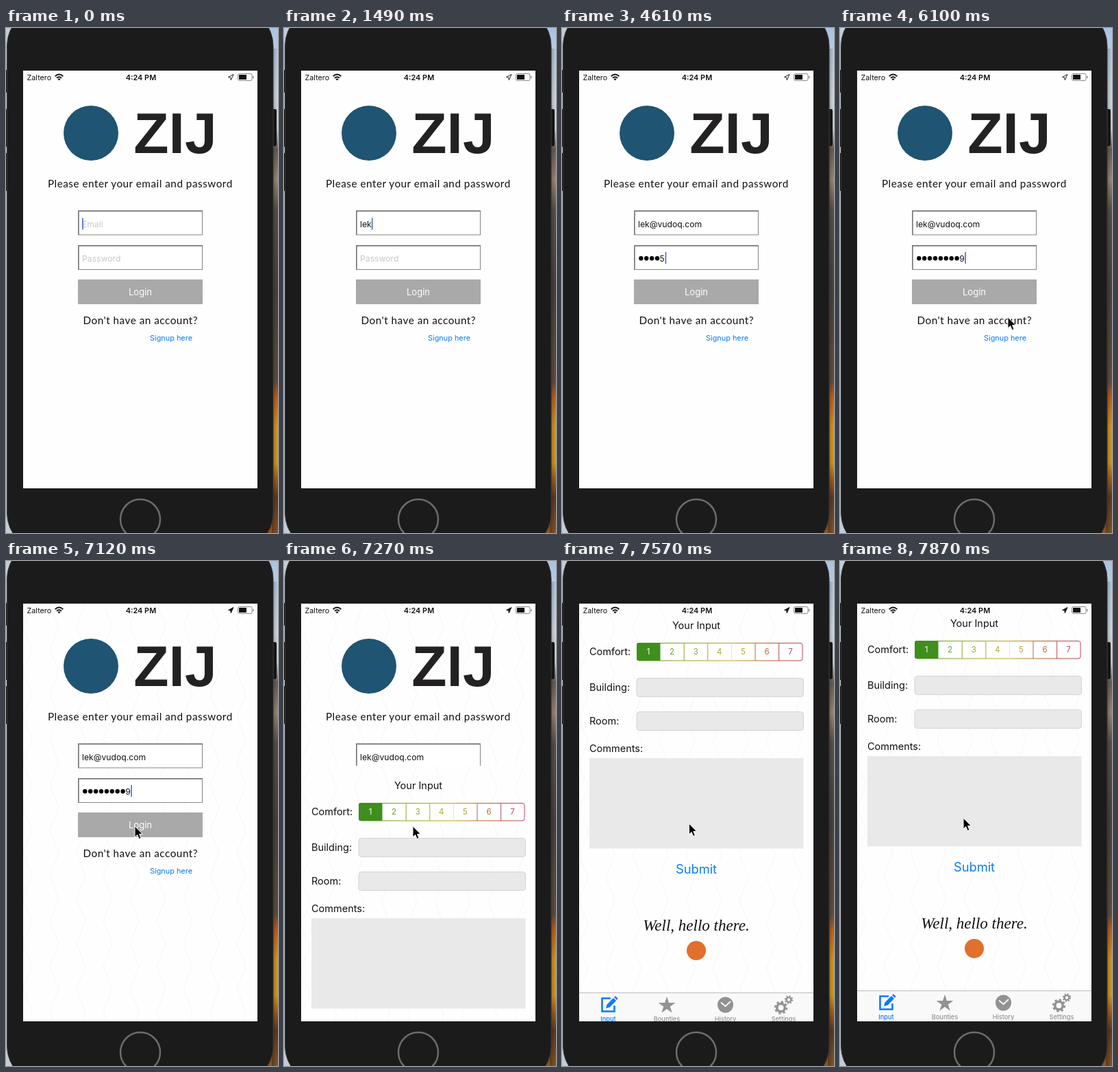
These frames come from a looping animation (397 px wide and 735 px high, 8 s). An HTML page:

```html
<!DOCTYPE html>
<html lang="en">
<head>
<meta charset="utf-8">
<title>Login</title>
<style>
  html, body { margin: 0; width: 100%; height: 100%; overflow: hidden; background: #1b1b1b; }
  svg { display: block; width: 100vw; height: 100vh; }
  text { font-family: Inter, "Open Sans", sans-serif; fill: #111; white-space: pre; }
  .head { font-family: Lato, sans-serif; font-size: 15.3px; letter-spacing: .5px; }
  .field { font-size: 12.2px; }
  .hint { fill: #c9c9cd; }
  .label { font-size: 14.5px; }
  .mid { text-anchor: middle; }
  .tab { font-size: 9.2px; font-weight: 500; fill: #929292; text-anchor: middle; }
  .blue { fill: #0a7bf5; }
</style>
</head>
<body>
<svg viewBox="0 0 397 735" preserveAspectRatio="none">
  <defs>
    <linearGradient id="sky" x2="0" y2="1">
      <stop offset="0" stop-color="#a9c2e2"/>
      <stop offset=".14" stop-color="#d5dde6"/>
      <stop offset=".2" stop-color="#c9cbd0"/>
      <stop offset=".24" stop-color="#6a5d57"/>
      <stop offset=".3" stop-color="#a08b73"/>
      <stop offset=".36" stop-color="#5b514c"/>
      <stop offset=".52" stop-color="#4b423f"/>
      <stop offset=".7" stop-color="#63503f"/>
      <stop offset=".73" stop-color="#c4601e"/>
      <stop offset=".79" stop-color="#dc9a1e"/>
      <stop offset=".86" stop-color="#d99c1c"/>
      <stop offset=".89" stop-color="#a9651c"/>
      <stop offset=".93" stop-color="#5d3a24"/>
      <stop offset="1" stop-color="#8a5526"/>
    </linearGradient>
    <linearGradient id="shade">
      <stop offset="0" stop-color="#000" stop-opacity=".3"/>
      <stop offset="1" stop-color="#000" stop-opacity="0"/>
    </linearGradient>
    <linearGradient id="scale" gradientUnits="userSpaceOnUse" x1="109" x2="351" y1="0" y2="0">
      <stop offset="0" stop-color="#3f8f1c"/>
      <stop offset=".25" stop-color="#86a52a"/>
      <stop offset=".55" stop-color="#b9a62c"/>
      <stop offset=".8" stop-color="#bd5a2c"/>
      <stop offset="1" stop-color="#c2405a"/>
    </linearGradient>
    <pattern id="hex" width="78" height="66" patternUnits="userSpaceOnUse" x="25" y="62">
      <path d="M13 0 0 33 13 66M39 0 52 33 39 66" fill="none" stroke="#f5f5f5"/>
    </pattern>
    <clipPath id="screen"><rect x="25" y="62" width="342" height="608"/></clipPath>
  </defs>

  <rect width="397" height="735" fill="#c4ccd6"/>
  <rect x="370" width="27" height="735" fill="url(#sky)"/>
  <rect x="388" y="30" width="9" height="705" fill="url(#shade)"/>
  <path d="M0 61h3v33H0ZM0 118h3v55H0ZM0 182h3v55H0ZM389 118h4q2 0 2 3v48q0 3-2 3h-4Z" fill="#161616"/>
  <rect x="1.500" y="-29" width="388.500" height="790" rx="55" fill="#1b1b1b" stroke="#3c3c3c"/>
  <circle cx="196" cy="715" r="29" fill="#1b1b1b" stroke="#6c6c6c" stroke-width="2.500"/>

  <g clip-path="url(#screen)">
    <rect x="25" y="62" width="342" height="608" fill="#fefefe"/>
    <rect id="hexes" x="25" y="62" width="342" height="608" fill="url(#hex)"/>

    <circle cx="124" cy="153" r="40" fill="#1f5472"/>
    <text class="mid" x="247" y="182" style="font:bold 84px 'Liberation Sans',sans-serif;fill:#232122">ZIJ</text>
    <text class="head mid" x="195.800" y="232">Please enter your email and password</text>

    <g fill="#fff" stroke="#858585">
      <rect x="105.500" y="266" width="181" height="35"/>
      <rect x="105.500" y="316.500" width="181" height="35"/>
      <path d="M106 301V266.500H287M106 351.500V317H287" fill="none" stroke="#777" stroke-width="1.400"/>
    </g>
    <text id="mail" class="field" x="111" y="289.500"></text>
    <g id="dots"></g>
    <text id="pass" class="field" y="339.500"></text>
    <rect id="caret" width="1.500" height="17" fill="#3f5fdc"/>

    <rect x="105" y="366" width="182" height="36" fill="#a9a9a9"/>
    <text class="mid" x="196" y="389" style="font-size:13px;fill:#fff">Login</text>
    <text class="head mid" x="196.300" y="431">Don't have an account?</text>
    <text class="mid blue" x="241" y="455" font-size="10.900">Signup here</text>

    <g id="sheet">
      <rect x="25" y="62" width="342" height="608" fill="#fefefe"/>
      <rect x="25" y="62" width="342" height="608" fill="url(#hex)"/>
      <text class="mid label" x="196" y="95.500">Your Input</text>
      <text class="label" x="40" y="134">Comfort:</text>
      <text class="label" x="40" y="186">Building:</text>
      <text class="label" x="40" y="235">Room:</text>
      <text class="label" x="40" y="275">Comments:</text>

      <rect x="109.500" y="116.500" width="241.500" height="25.500" rx="3" fill="#fff" stroke="url(#scale)"/>
      <path d="M143.500 116H112q-3 0-3 3v20q0 3 3 3h31.500Z" fill="#3f8f1c"/>
      <g id="marks"></g>

      <g fill="#e9e9e9" stroke="#d4d4d4">
        <rect x="109" y="167.500" width="243.500" height="27" rx="4"/>
        <rect x="109" y="216.500" width="243.500" height="27" rx="4"/>
      </g>
      <rect x="40" y="284" width="312.500" height="131.500" fill="#e9e9e9"/>
      <text class="mid blue" x="196" y="451.500" font-size="18.300">Submit</text>
      <text class="mid" x="196" y="535" style="font:italic 23px 'Liberation Serif',serif">Well, hello there.</text>
      <circle cx="196" cy="564" r="14" fill="#e0702c"/>

      <rect x="25" y="625" width="342" height="45" fill="#f9f9f9"/>
      <path d="M25 625.500H367" stroke="#bcbcbc"/>
      <path d="M71 633.500H58.500V652.500H76.500V644" fill="none" stroke="#0a7bf5" stroke-width="2.600"/>
      <path d="M64 648 65.500 642.500 75 633 79 637 69.500 646.500ZM76 632 78 630.200 81.500 633.500 80 636Z" class="blue"/>
      <path id="star" fill="#929292"/>
      <circle cx="238.500" cy="643" r="11.500" fill="#929292"/>
      <path d="M232 639.500 238.500 645 246 638" fill="none" stroke="#f9f9f9" stroke-width="2"/>
      <g fill="none" stroke="#929292">
        <circle cx="319.500" cy="647" r="5.800" stroke-width="3.600"/>
        <circle cx="319.500" cy="647" r="8.400" stroke-width="2.600" stroke-dasharray="3.300"/>
        <circle cx="331" cy="635.500" r="3.400" stroke-width="2.400"/>
        <circle cx="331" cy="635.500" r="5.200" stroke-width="2" stroke-dasharray="2.040"/>
      </g>
      <text class="tab blue" x="67.500" y="667">Input</text>
      <text class="tab" x="153" y="667">Bounties</text>
      <text class="tab" x="238.500" y="667">History</text>
      <text class="tab" x="323.500" y="667">Settings</text>
    </g>

    <text x="30.500" y="75.500" font-size="10.800">Zaltero</text>
    <g fill="none" stroke="#111" stroke-width="1.900">
      <path d="M71.700 70.300Q77.500 64.900 83.300 70.300M74 72.800Q77.500 69.500 81 72.800"/>
      <path d="M77.500 76.500 75.400 74.300Q77.500 72.600 79.600 74.300Z" fill="#111" stroke="none"/>
    </g>
    <text class="mid" x="197" y="75.500" font-size="10.900" font-weight="600">4:24 PM</text>
    <path id="place" d="M324.500 71.500 332 67.500 328.300 75.800 327.700 72Z" stroke="#222" stroke-linejoin="round"/>
    <rect x="338.500" y="66.500" width="20.500" height="10" rx="2" fill="#fff" stroke="#888"/>
    <rect x="340" y="68" width="11" height="7" fill="#111"/>
    <path d="M360.800 70v3.200" stroke="#888" stroke-width="1.400"/>
  </g>

  <path id="mouse" d="M0 0V16L3.700 12.600 6.300 18.600 9 17.400 6.500 11.600H11.500Z" fill="#000" stroke="#fff"/>
</svg>
<script>
const $ = id => document.getElementById(id);
const LOOP = 8000, TICK = 148.5;
const EMAIL = "lek@vudoq.com", DIGITS = "123456789", DOT = 7.9;
const passTicks = [24, 26, 27, 29, 31, 33, 35, 37, 39];
const fade = [1, .6, .25, 0, 0];
// tick, x, y
const mousePath = [[40, 377, 400], [41, 245, 421], [42, 215, 404], [43, 200, 394], [44, 193, 389],
  [46, 188, 386], [50, 188, 386], [53, 180, 374]];

const inks = ["#fff", "#62a52c", "#97a62c", "#aea72c", "#b9a32e", "#bf672c", "#c2485a"];
$("marks").innerHTML = inks.map((ink, i) => {
  const x = 109 + i * 34.6;
  const line = i > 1 ? `<path d="M${x} 117V142" stroke="${i === 4 ? "#e9e6c8" : ink}"/>` : "";
  return line + `<text class="mid" x="${x + 17}" y="133.3" font-size="11.5" style="fill:${ink}">${i + 1}</text>`;
}).join("");

$("dots").innerHTML = [...DIGITS].map((_, i) =>
  `<circle cx="${115.3 + i * DOT}" cy="335.2" r="3.2"/>`).join("");
const dots = [...$("dots").children];

$("star").setAttribute("d", "M" + Array.from({ length: 10 }, (_, i) => {
  const r = i % 2 ? 5 : 13, a = i * Math.PI / 5;
  return `${(153 + r * Math.sin(a)).toFixed(2)} ${(644 - r * Math.cos(a)).toFixed(2)}`;
}).join("L") + "Z");

function set(el, attrs) {
  for (const k in attrs) el.setAttribute(k, attrs[k]);
}

function write(el, value, hint) {
  el.textContent = value || hint;
  el.classList.toggle("hint", !value);
}

function along(path, n) {
  const i = path.findIndex(p => p[0] >= n);
  if (i < 1) return path[0].slice(1);
  const [a, b] = [path[i - 1], path[i]];
  const k = (n - a[0]) / (b[0] - a[0]);
  return [a[1] + (b[1] - a[1]) * k, a[2] + (b[2] - a[2]) * k];
}

// Critically damped spring for the sheet
function slide(t) {
  const u = Math.max(0, t - 7156) * .0179;
  return 608 * (1 + u) * Math.exp(-u);
}

function draw(t) {
  const n = Math.floor((t + 9) / TICK);
  const typed = n < 8 ? 0 : n < 19 ? n - 7 : EMAIL.length;
  const mail = EMAIL.slice(0, typed);
  write($("mail"), mail, "Email");

  const count = passTicks.filter(p => p <= n).length;
  const hidden = Math.max(0, count - 1);
  write($("pass"), DIGITS.slice(hidden, count), "Password");
  $("pass").setAttribute("x", 111 + hidden * DOT);
  dots.forEach((d, i) => d.setAttribute("visibility", i < hidden ? "visible" : "hidden"));

  const inPass = n >= 21;
  const end = inPass ? count * DOT : mail ? $("mail").getComputedTextLength() : 0;
  set($("caret"), { x: 111.2 + end, y: inPass ? 326 : 276.5, opacity: fade[n] ?? 1 });

  const late = n >= 47;
  $("hexes").setAttribute("visibility", late ? "visible" : "hidden");
  $("place").setAttribute("fill", late ? "#111" : "none");
  $("sheet").setAttribute("transform", `translate(0 ${Math.round(slide(n * 148.4))})`);

  const [x, y] = along(mousePath, n);
  set($("mouse"), { transform: `translate(${x} ${y})`, visibility: n >= 40 ? "visible" : "hidden" });
}

const start = performance.now();
function frame() {
  draw((performance.now() - start) % LOOP);
  requestAnimationFrame(frame);
}
frame();
</script>
</body>
</html>
```
